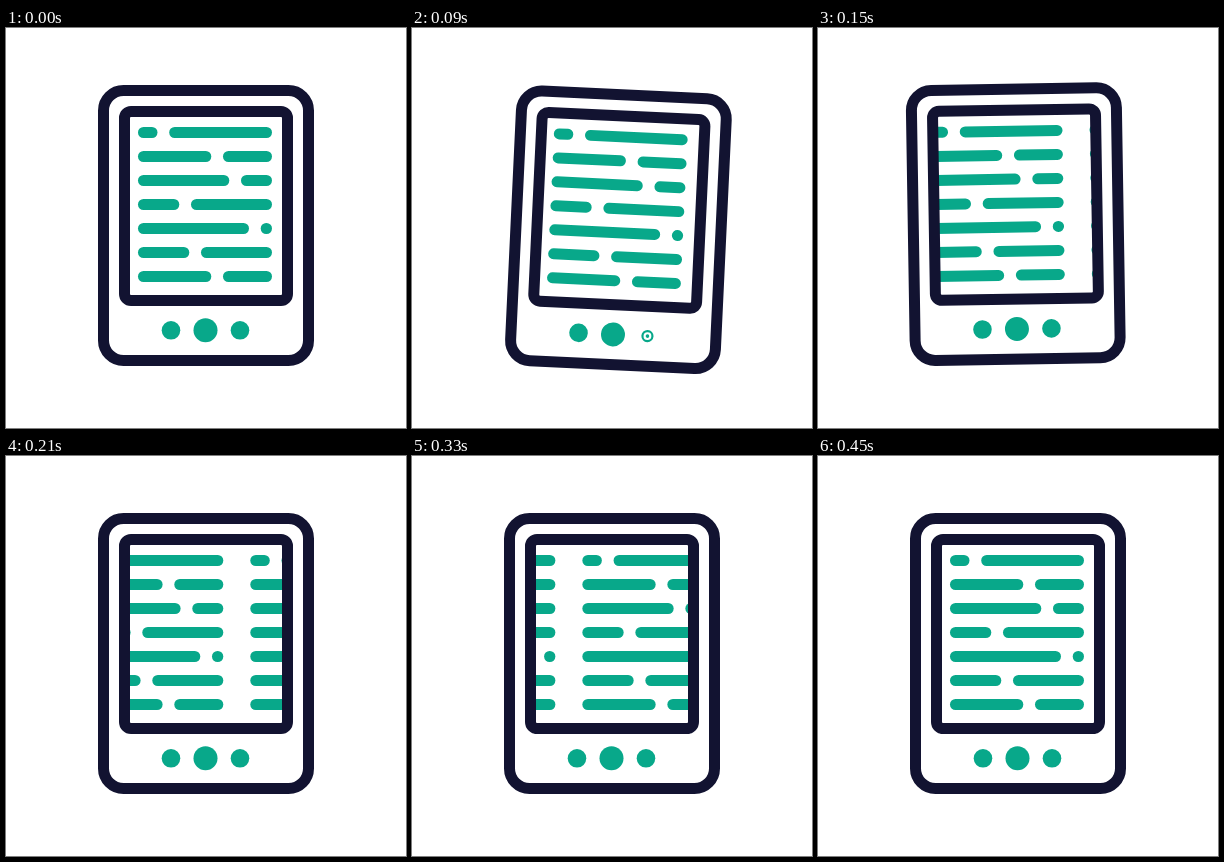
An HTML page for the animation above (510 ms loop, 400x400 px).

```html
<!DOCTYPE html>
<html lang="en">
<head>
<meta charset="utf-8">
<title>E-reader page turn</title>
<style>
  html, body { margin: 0; width: 100%; height: 100%; overflow: hidden; background: #fff; }
  svg { display: block; width: 100vw; height: 100vh; }
  .line { fill: none; stroke: #121331; stroke-width: 11; }
  .ink { fill: #08a88a; }
</style>
</head>
<body>
<svg viewBox="0 0 400 400">
  <clipPath id="screen"><rect x="122" y="87" width="156" height="182"/></clipPath>
  <g id="device">
    <rect class="line" x="97.5" y="62.5" width="205" height="270" rx="20"/>
    <g clip-path="url(#screen)"><g id="pages" class="ink"></g></g>
    <rect class="line" x="118.5" y="83.5" width="163" height="189" rx="6.5"/>
    <g class="ink">
      <circle cx="165" cy="302.3" r="9.3"/>
      <circle cx="199.5" cy="302.3" r="12"/>
      <circle id="button" cx="234" cy="302.3" r="9.3"/>
    </g>
    <g id="ring" fill="none" stroke="#08a88a" stroke-width="2.2">
      <circle cx="234" cy="302.3" r="5"/>
      <circle class="ink" cx="234" cy="302.3" r="1.8" stroke="none"/>
    </g>
  </g>
</svg>
<script>
  const STEP = 30, STEPS = 17, PAGE = 161;
  const LEFT = 132, RIGHT = 266, GAP = 11.7;
  const breaks = [151.5, 205.3, 223.3, 173.3, 243, 183.3, 205.3];

  // Values per step; anything past the end is at rest
  const tilt = [0, 0.6, 2, 2.7, 0.95, -0.92, -0.5];
  const press = [9.3, 8.8, 7.4, 0, 7.6];

  const $ = id => document.getElementById(id);
  const device = $('device'), pages = $('pages'), button = $('button'), ring = $('ring');

  function bar(x1, x2, y) {
    const r = document.createElementNS('http://www.w3.org/2000/svg', 'rect');
    const attrs = { x: x1, y: y - 5.5, width: x2 - x1, height: 11, rx: 5.5 };
    for (const k in attrs) r.setAttribute(k, attrs[k]);
    pages.append(r);
  }

  for (const dx of [0, PAGE]) {
    breaks.forEach((b, i) => {
      const y = 104.5 + 24 * i;
      bar(LEFT + dx, b + dx, y);
      bar(b + GAP + dx, RIGHT + dx, y);
    });
  }

  function scroll(n) {
    const s = Math.min(1, Math.max(0, (n - 2.4) / 12.6));
    return PAGE * s * s * (3 - 2 * s);
  }

  function draw(n) {
    device.setAttribute('transform', `rotate(${tilt[n] ?? 0} 112 336)`);
    pages.setAttribute('transform', `translate(${-scroll(n)} 0)`);
    button.setAttribute('r', press[n] ?? 9.3);
    ring.setAttribute('visibility', n === 3 ? 'visible' : 'hidden');
  }

  const start = performance.now();
  function tick() {
    draw(Math.floor((performance.now() - start) / STEP) % STEPS);
    requestAnimationFrame(tick);
  }
  tick();
</script>
</body>
</html>
```
